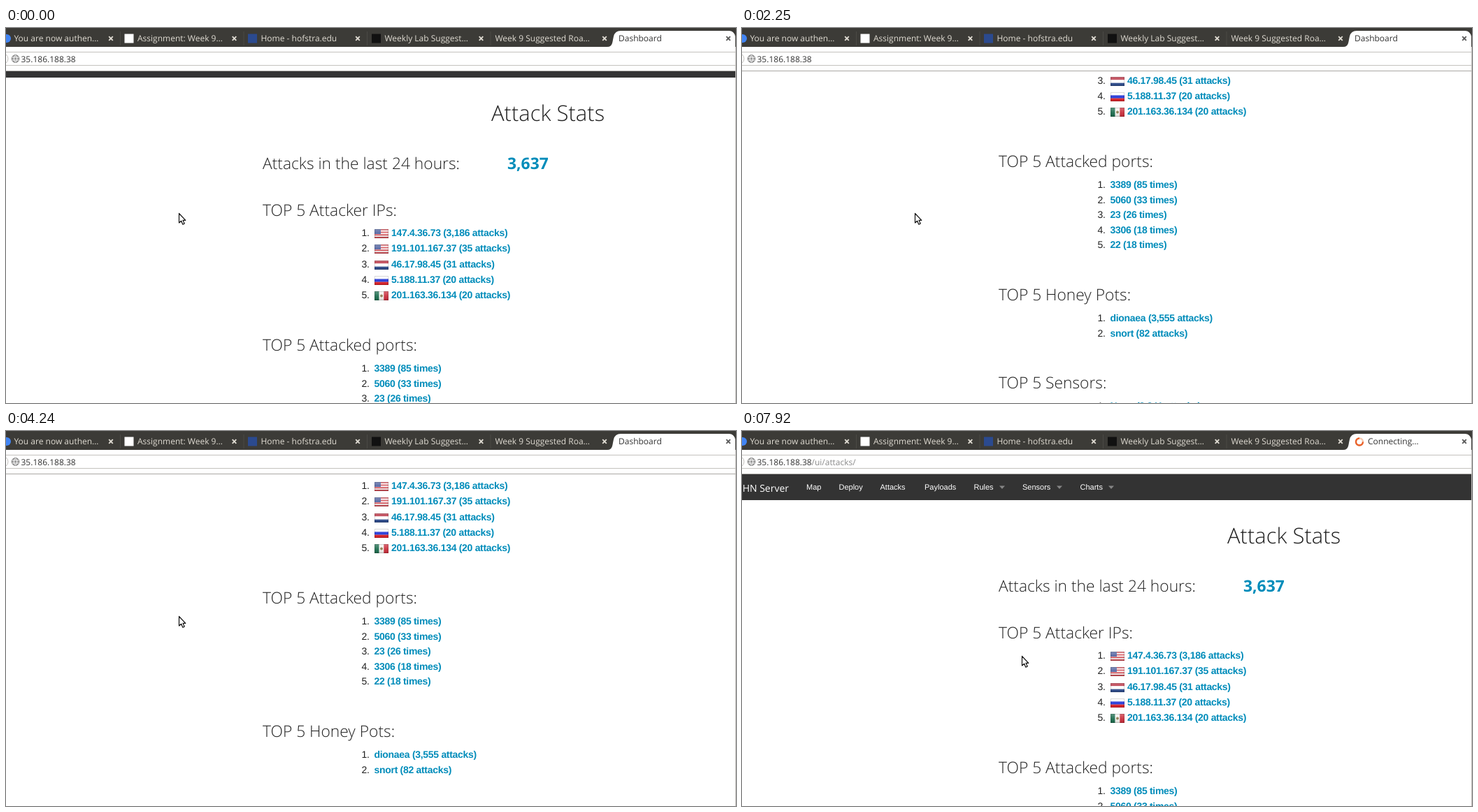
These frames come from a looping animation (1044 by 537 pixels, 8 s). An HTML page:

```html
<!DOCTYPE html>
<html lang="en">
<head>
<meta charset="utf-8">
<title>Dashboard</title>
<style>
html, body { margin: 0; width: 100%; height: 100%; overflow: hidden; background: #fff; }
svg { display: block; width: 1044px; height: 537px; text-rendering: geometricPrecision; }
.ui { font: 500 12px "Open Sans", sans-serif; fill: #dfdbd2; }
.ui .dark { fill: #333; }
.ui .dim { fill: #8a8a8a; }
.nav { font: 11px "Liberation Sans", Arial, sans-serif; fill: #fff; }
.brand { font: 14px "Open Sans", sans-serif; fill: #fff; }
.title { font: 300 31px "Open Sans", sans-serif; fill: #222; }
.head { font: 300 22.8px "Open Sans", sans-serif; fill: #222; }
.total { font: 700 22.8px "Open Sans", sans-serif; fill: #008cba; }
.row { font: 14px "Liberation Sans", Arial, sans-serif; letter-spacing: -.3px; fill: #222; }
.row .link { font-weight: 700; fill: #008cba; }

#page, #cursor, .on { animation: 8s step-end infinite; }
#page { animation-name: scroll; }
#cursor { animation-name: move; }
#arrow { animation-name: arrow; }
#hand { animation-name: hand; }
#hover-deploy { animation-name: deploy; }
#hover-attacks { animation-name: attacks; }
#hover-payloads { animation-name: payloads; }
.idle { animation-name: idle; }
.busy { animation-name: busy; }

@keyframes scroll {
  0% { transform: translateY(-28px); }
  1.5% { transform: translateY(-54px); }
  11.75% { transform: translateY(-70px); }
  13.375% { transform: translateY(-92px); }
  15.125% { transform: translateY(-108px); }
  18.5% { transform: translateY(-148px); }
  20.5% { transform: translateY(-190px); }
  22.375% { transform: translateY(-216px); }
  28.125% { transform: translateY(-291px); }
  30% { transform: translateY(-400px); }
  31.875% { transform: translateY(-487px); }
  35.25% { transform: translateY(-516px); }
  37.125% { transform: translateY(-541px); }
  47.25% { transform: translateY(-505px); }
  49.125% { transform: translateY(-420px); }
  51.125% { transform: translateY(-330px); }
  53% { transform: translateY(-243px); }
  54.875% { transform: translateY(-100px); }
  56.875%, 100% { transform: translateY(0); }
}
@keyframes move {
  0% { transform: translate(247px, 265px); }
  63.75% { transform: translate(256px, 232px); }
  65.5% { transform: translate(240px, 170px); }
  67.25% { transform: translate(206px, 130px); }
  68.875% { transform: translate(172px, 106px); }
  70.625% { transform: translate(147px, 83px); }
  72.375% { transform: translate(156px, 79px); }
  74% { transform: translate(194px, 80px); }
  75.75% { transform: translate(231px, 82px); }
  77.625% { transform: translate(264px, 82px); }
  79.375% { transform: translate(296px, 82px); }
  81.125% { transform: translate(264px, 82px); }
  82.875% { transform: translate(235px, 82px); }
  95.5% { transform: translate(262px, 130px); }
  97.25% { transform: translate(340px, 235px); }
  99%, 100% { transform: translate(400px, 322px); }
}
@keyframes arrow { 0%, 95.5%, 100% { opacity: 1; } 70.625% { opacity: 0; } }
@keyframes hand { 0%, 95.5%, 100% { opacity: 0; } 70.625% { opacity: 1; } }
@keyframes deploy { 0%, 74%, 100% { opacity: 0; } 70.625% { opacity: 1; } }
@keyframes attacks { 0%, 77.625%, 95.5%, 100% { opacity: 0; } 74%, 82.875% { opacity: 1; } }
@keyframes payloads { 0%, 82.875%, 100% { opacity: 0; } 77.625% { opacity: 1; } }
@keyframes idle { 0% { opacity: 1; } 93.75%, 100% { opacity: 0; } }
@keyframes busy { 0% { opacity: 0; } 93.75%, 100% { opacity: 1; } }
</style>
</head>
<body>
<svg viewBox="0 0 1044 537">
  <defs>
    <clipPath id="view"><rect y="62" width="1043" height="475"/></clipPath>
    <linearGradient id="gloss" x2="0" y2="1">
      <stop offset="0" stop-color="#fff" stop-opacity=".3"/>
      <stop offset=".55" stop-color="#fff" stop-opacity=".08"/>
      <stop offset="1" stop-color="#000" stop-opacity=".12"/>
    </linearGradient>
  </defs>
  <rect width="1044" height="537" fill="#fff"/>

  <g clip-path="url(#view)">
    <g id="page">
      <rect y="61" width="1044" height="38" fill="#333"/>
      <g fill="#222">
        <rect id="hover-deploy" class="on" x="126" y="61" width="59" height="38"/>
        <rect id="hover-attacks" class="on" x="185" y="61" width="63" height="38"/>
        <rect id="hover-payloads" class="on" x="248" y="61" width="71" height="38"/>
      </g>
      <text class="brand" x="67" y="87" text-anchor="end">MHN Server</text>
      <g class="nav" id="nav"></g>
      <text class="title" x="694" y="161">Attack Stats</text>
      <text class="head" x="367" y="230">Attacks in the last 24 hours:</text>
      <text class="total" x="717" y="230">3,637</text>
      <g id="stats"></g>
    </g>
  </g>

  <rect width="1044" height="27" fill="#3c3b37"/>
  <path d="M860 27C868 27 867 20 869 12Q871 4 879 4H1034Q1041 4 1043 12V27Z" fill="#fff"/>
  <path d="M0 34.5H1043M0 53.5H1043" stroke="#c4c2be"/>
  <path d="M0 38Q3 40 3 44T0 50" fill="none" stroke="#c4c2be"/>
  <path d="M0 61.5H1044" stroke="#aaa8a4"/>
  <path d="M1043.5 27V537" stroke="#bdbbb8"/>
  <g id="tabs" class="ui"></g>
  <g class="ui">
    <g fill="none" stroke="#fff" stroke-width=".9">
      <circle cx="13.5" cy="44" r="5.5" fill="#999" stroke="#888"/>
      <path d="M8.5 42H18.5M8.5 46H18.5M13.5 39Q9 44 13.5 49M13.5 39Q18 44 13.5 49"/>
    </g>
    <text class="dark" x="21.5" y="48.5">35.186.188.38</text>
    <text class="dim on busy" x="99.5" y="48.5">/ui/attacks/</text>
    <text class="dark on idle" x="876" y="19">Dashboard</text>
    <g class="on busy">
      <circle cx="883" cy="15.5" r="5" fill="none" stroke="#f6c9b0" stroke-width="2.4"/>
      <path d="M883 10.5A5 5 0 1 0 888 15.5" fill="none" stroke="#e9622b" stroke-width="2.4"/>
      <text class="dark" x="895" y="19">Connecting…</text>
    </g>
  </g>

  <g id="cursor" fill="#fff" stroke="#111" stroke-linejoin="round">
    <path id="arrow" class="on" d="M.5.5V14L3.6 11.2 5.8 16.2 8.2 15.1 6 10.3H9.8Z" stroke-width="1.2"/>
    <path id="hand" class="on" d="M-1.5 7V.8Q0-.8 1.5.8V4.5Q3 3.7 4 5 5.4 4.4 6.2 5.6 8 5.3 8 7V10Q8 12.5 6.2 13H-.8Q-2.6 11.6-5.6 8.4-5.3 6.2-3.4 7.2L-1.5 8.6Z" stroke-width=".9"/>
  </g>
</svg>

<script>
const $ = id => document.getElementById(id);
const rect = (x, y, w, h, fill) =>
  `<rect x="${x}" y="${y}" width="${w}" height="${h}" fill="${fill}"/>`;
const text = (x, y, str, cls = '') => `<text x="${x}" y="${y}" class="${cls}">${str}</text>`;

const bands = colors => colors.map((c, i) =>
  rect(0, i * 13 / colors.length, 20, 13 / colors.length, c)).join('');
const flags = {
  us: bands(['#d0414a', '#f6e9e9', '#d0414a', '#f6e9e9', '#d0414a', '#f6e9e9', '#d0414a'])
    + rect(0, 0, 9, 7, '#4a5c9c'),
  nl: bands(['#b5283a', '#fff', '#2c4b8e']),
  ru: bands(['#fff', '#1a2fd6', '#e01f26']),
  mx: rect(0, 0, 6.7, 13, '#17694a') + rect(6.7, 0, 6.6, 13, '#f4f4f0')
    + rect(13.3, 0, 6.7, 13, '#c92a38') + '<circle cx="10" cy="6.5" r="2" fill="#8d7a4e"/>'
};
const flag = (key, y) => `<g transform="translate(527 ${y})">${flags[key]}
  <rect width="20" height="13" fill="url(#gloss)"/>
  <rect x=".5" y=".5" width="19" height="12" fill="none" stroke="#000" stroke-opacity=".15"/></g>`;

// Heading baseline, first row baseline, row pitch, rows, optional flags
const sections = [
  ['Attacker IPs', 297, 326, 22.25, ['147.4.36.73 (3,186 attacks)', '191.101.167.37 (35 attacks)',
    '46.17.98.45 (31 attacks)', '5.188.11.37 (20 attacks)', '201.163.36.134 (20 attacks)'],
    ['us', 'us', 'nl', 'ru', 'mx']],
  ['Attacked ports', 490, 520, 21.6, ['3389 (85 times)', '5060 (33 times)', '23 (26 times)',
    '3306 (18 times)', '22 (18 times)']],
  ['Honey Pots', 681, 711, 21.6, ['dionaea (3,555 attacks)', 'snort (82 attacks)']],
  ['Sensors', 807, 837, 21.6, ['None (3,241 attacks)', 'mhn-honeypot-1 (314 attacks)',
    'mhn-honeypot-2 (82 attacks)']],
  ['Attacks Signatures', 955, 985, 21.6, [
    'ET DROP Dshield Block Listed Source group 1 (24 times)',
    'ET CINS Active Threat Intelligence Poor Reputation IP TCP group 3 (11 times)',
    'ET CINS Active Threat Intelligence Poor Reputation IP TCP group 4 (6 times)',
    'ET CINS Active Threat Intelligence Poor Reputation IP TCP group 62 (6 times)',
    'ET SCAN Sipvicious User-Agent Detected (friendly-scanner) (4 times)']]
];
$('stats').innerHTML = sections.map(([name, headY, top, pitch, rows, icons]) =>
  text(367, headY, `TOP 5 ${name}:`, 'head') + '<g class="row">' + rows.map((row, i) => {
    const y = Math.round(top + i * pitch);
    return text(508.5, y, `${i + 1}.`)
      + (icons ? flag(icons[i], y - 10) : '')
      + text(icons ? 551 : 526.5, y, row, 'link');
  }).join('') + '</g>').join('');

const menu = [['Map', 92], ['Deploy', 138.5], ['Attacks', 197.5], ['Payloads', 261],
  ['Rules', 331.5, 368], ['Sensors', 401, 450], ['Charts', 483.5, 524]];
$('nav').innerHTML = menu.map(([name, x, caret]) => text(x, 84, name)
  + (caret ? `<path d="M${caret} 78.5h8l-4 4.5z" fill="#858585"/>` : '')).join('');

const tabs = [['You are now authen…', 11.5], ['Assignment: Week 9…', 188, '#fff'],
  ['Home - hofstra.edu', 364.5, '#2b4a8f'], ['Weekly Lab Suggest…', 541.5, '#111'],
  ['Week 9 Suggested Roa…', 699.5]];
const cross = (x, color) =>
  `<path d="M${x - 2.8} 12.2l5.6 5.6m0-5.6l-5.6 5.6" stroke="${color}" stroke-width="1.9"/>`;
$('tabs').innerHTML = '<circle cx="1" cy="15" r="6" fill="#4285f4"/>'
  + tabs.map(([name, x, icon], i) => text(x, 19, name)
    + (icon ? rect(x - 18.5, 8.5, 13, 13, icon) : '')
    + cross(150 + i * 176.5, '#dfdbd2')
    + (i < 4 ? rect(163 + i * 176.5, 5, 1, 20, '#4b4a45') : '')).join('')
  + cross(1033, '#5a5a5a');
</script>
</body>
</html>
```
